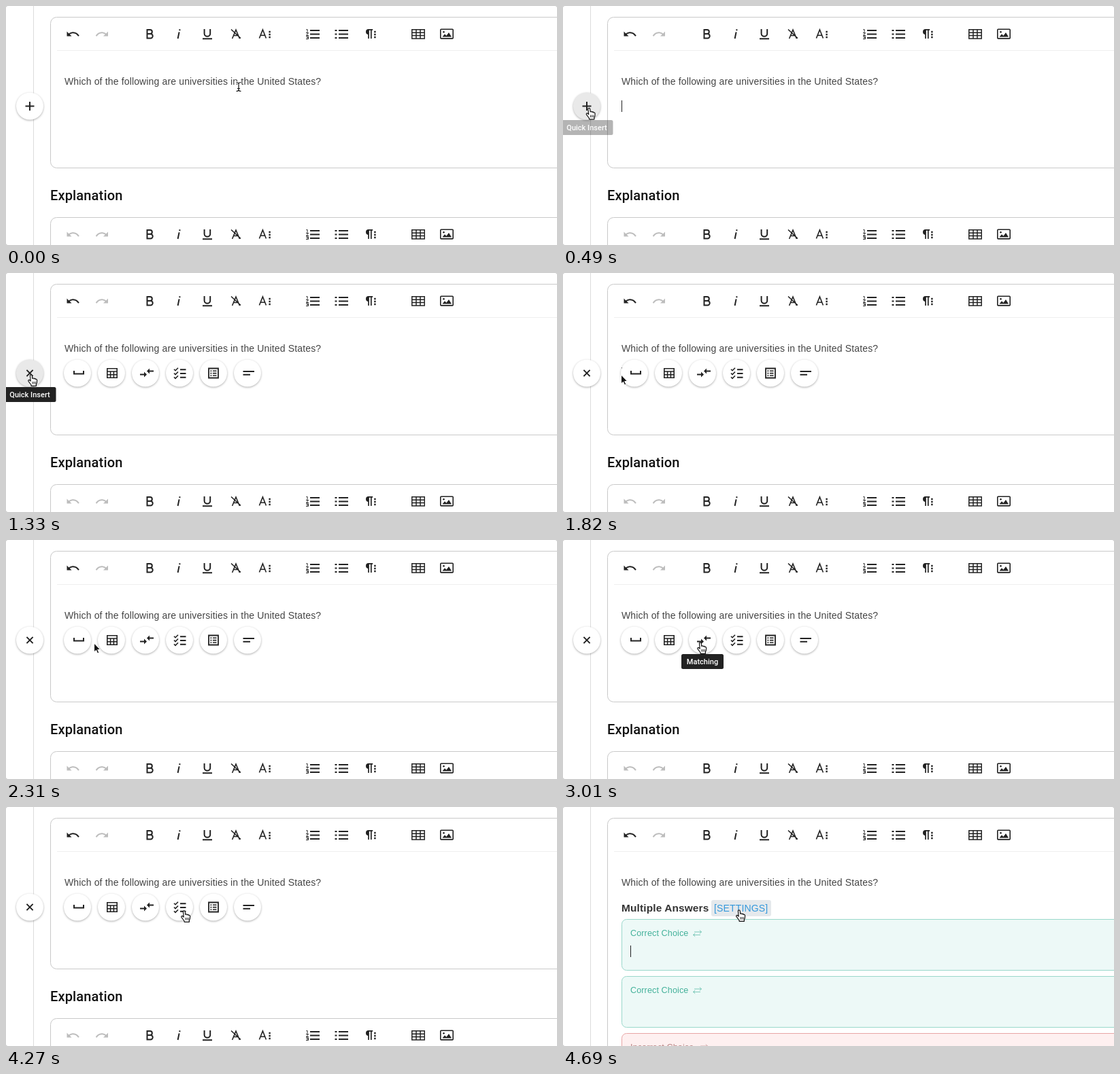
An HTML page for the animation above (4760 ms loop, 810 by 352 pixels).

```html
<!DOCTYPE html>
<html lang="en">
<head>
<meta charset="utf-8">
<title>Quick insert</title>
<style>
html, body { margin: 0; width: 100%; height: 100%; overflow: hidden; background: #fff; }
svg { display: block; }
.line { fill: none; stroke: #222; stroke-width: 2; }
.thin { stroke-width: 1.6; }
.box { fill: #fff; stroke: #c9c9c9; }
.body { font: 14px "Liberation Sans", Arial, sans-serif; letter-spacing: .15px; fill: #444; }
.head { font: 500 20px Roboto, sans-serif; letter-spacing: .15px; fill: #111; }
.tip text { font: 500 11px Roboto, sans-serif; fill: #fff; text-anchor: middle; }
.label { font: 12.6px "Liberation Sans", Arial, sans-serif; letter-spacing: .1px; }
.disc { fill: #fff; filter: drop-shadow(0 1px 1.5px rgba(0,0,0,.32)); }
.press { fill: #000; opacity: .22; filter: blur(7px); }
</style>
</head>
<body>
<svg width="810" height="352" viewBox="0 0 810 352">
  <defs>
    <path id="undo" d="M10.4 9.4c-1.7.3-3.2.9-4.6 2L3 8.5v7h7l-2.7-2.7c3.7-2.6 8.8-1.8 11.5 1.9.2.3.5.7.7 1l1.8-.9c-2.2-4.2-6.6-6.4-10.9-5.4z"/>
    <g id="dots"><path d="M-1.2-5.2h2.4v2.4h-2.4zM-1.2-1.2h2.4v2.4h-2.4zM-1.2 2.8h2.4v2.4h-2.4z" fill="#222"/></g>
    <g id="tools">
      <use href="#undo" transform="translate(129 29) translate(24 0) scale(-1 1)" fill="#bdbdbd"/>
      <path class="line" d="M207.5 35h4.3a3 3 0 0 1 0 6h-4.3zM207.5 41h5a3.2 3.2 0 0 1 0 6.4h-5z"/>
      <path class="line" d="M252.6 48l2-9.6M255.2 36.2l.4-2"/>
      <path class="line" d="M291.6 34v6.4a4.3 4.3 0 0 0 8.6 0V34M289 48.2h14"/>
      <path class="line thin" d="M332.6 48l5.4-13 5.4 13M334.6 43.5h7M331 34.5l14 13"/>
      <path class="line thin" d="M372.4 47.5l5-12.5 5 12.5M374 43.2h6.8"/>
      <use href="#dots" x="387.6" y="42"/>
      <path class="line" d="M447 36h14M447 41.5h14M447 47h14M489 36h14M489 41.5h14M489 47h14"/>
      <path class="line" stroke-dasharray="3 20" d="M483.5 36h3M483.5 41.5h3M483.5 47h3"/>
      <path class="line" style="stroke-width:1" d="M441.5 34.5h1.5v4M441 39.5h3.5l-3 4h3.5M441 45h3.5v3.5h-3.5M442 46.7h2.5"/>
      <path d="M533 34a4 4 0 0 0 0 8z" fill="#222"/>
      <path class="line" style="stroke-width:1.7" d="M533 48V35M536.8 48V35M532 34.9h7.2"/>
      <use href="#dots" x="542.4" y="42"/>
      <path class="line" style="stroke-width:1.5" d="M596.8 34.8h18.4v13.2h-18.4zM596.8 39.2h18.4M596.8 43.6h18.4M603 34.8v13.2M609 34.8v13.2"/>
      <rect class="line thin" x="638.8" y="34.3" width="18.4" height="13.6" rx="1"/>
      <path d="M641.5 45.5l3.5-4.2 2.4 2.4 3.6-4.6 4 6.4z" fill="#222"/>
      <circle cx="643.5" cy="38.2" r="1.3" fill="#222"/>
    </g>
    <g id="swap"><path d="M2 3.2h10.5M9.8.8l2.7 2.4-2.7 2.4M11 7.6H.5M3.2 5.2L.5 7.6 3.2 10" fill="none"/></g>
  </defs>

  <rect width="810" height="352" fill="#c4c4c4"/>
  <rect width="810" height="352" rx="3" fill="#fff"/>
  <path d="M40.5 0v352" stroke="#dcdcdc"/>

  <rect id="editor" class="box" x="65.5" y="16.5" width="780" height="222" rx="9"/>
  <path d="M75 65.5h735" stroke="#efefef"/>
  <use href="#undo" x="86.5" y="29" fill="#222"/>
  <use href="#tools"/>
  <text class="body" x="86" y="116">Which of the following are universities in the United States?</text>

  <g id="lower">
    <text class="head" x="65" y="285.5">Explanation</text>
    <rect class="box" x="65.5" y="311.5" width="780" height="222" rx="9"/>
    <use href="#undo" x="86.5" y="324" fill="#bdbdbd"/>
    <use href="#tools" y="295"/>
  </g>

  <g id="answers">
    <text class="body" x="86" y="154" style="font-size:15.4px;font-weight:bold;fill:#333">Multiple Answers</text>
    <rect x="218" y="137" width="88" height="24" rx="3" fill="#e5e9ec"/>
    <text class="body" x="222" y="154" style="fill:#3498db">[SETTINGS]</text>
    <g id="choices"></g>
  </g>

  <rect id="caret" width="1" height="17" fill="#222"/>
  <g id="dial"></g>
  <g id="tips"></g>

  <g id="cursor" stroke-linejoin="round">
    <g id="beam" fill="none">
      <path d="M-3.5-6.5Q0-6.5 0-4.5V4.5Q0 6.5-3.5 6.5M3.5-6.5Q0-6.5 0-4.5V4.5Q0 6.5 3.5 6.5M-2 2.5h4" stroke="#fff" stroke-width="3"/>
      <path d="M-3.5-6.5Q0-6.5 0-4.5V4.5Q0 6.5-3.5 6.5M3.5-6.5Q0-6.5 0-4.5V4.5Q0 6.5 3.5 6.5M-2 2.5h4" stroke="#111" stroke-width="1.2"/>
    </g>
    <path id="arrow" d="M.5 0v13l3-2.7 2.1 4.7 2.2-1-2.1-4.5h4z" fill="#111" stroke="#fff"/>
    <g id="hand">
      <path d="M-1.6 1C-1.6-.6 1-.6 1.2 1L1.8 5.5C2.2 4.4 4 4.5 4.2 6 4.7 5 6.3 5.3 6.5 6.7 7.2 6 8.5 6.5 8.6 8L8.4 11.5 7.4 14V16.3H.2L-.2 14.5-3.9 9.6C-5 8-3.2 6.6-2 8L-.8 9.2Z" fill="#fff" stroke="#111" stroke-width="1.2"/>
      <path d="M2 10v3.6M4.1 10v3.6M6.2 10v3.6" stroke="#111" stroke-width=".9"/>
    </g>
  </g>
</svg>
<script>
const LOOP = 4760, STEP = 70, DIAL_Y = 147.5;
const $ = id => document.getElementById(id);
const clamp = v => Math.max(0, Math.min(1, v));
const ramp = (t, a, b) => clamp((t - a) / (b - a));
const show = (el, on) => el.setAttribute('display', on ? 'inline' : 'none');

// Icons are drawn around the centre of each round button
const ICONS = [
  '<path class="line" d="M-5-3.5v4.6H9v-4.6"/>',
  '<path class="line thin" d="M-6.2-6.7H8.2V6.7H-6.2zM-6.2-2.5H8.2M-6.2 2.2H8.2M-1.4-2.5V6.7M3.4-2.5V6.7"/>',
  '<path class="line" d="M-8 2H-1M12-3H5"/><path d="M-2-2l4 4-4 4zM6-7l-4 4 4 4z" fill="#222"/>',
  '<path class="line" d="M1-5.3h8.5M1 .5h8.5M1 6.3h8.5"/>' +
    '<path class="line thin" d="M-8-5.8l2 2 4-4M-8 0l2 2 4-4M-8 5.8l2 2 4-4"/>',
  '<path class="line" d="M-7-7H7V7H-7z" style="stroke-width:1.8"/>' +
    '<path class="line thin" d="M-4.6-3.3h2M-4.6.1h2M-4.6 3.5h2M-1-3.3h5.5M-1 .1h5.5M-1 3.5h5.5"/>',
  '<path class="line" d="M-6.5-2.5H10M-6.5 2.3H4"/>'
];
const disc = icon => `<g><circle class="press" r="21" cy="5"/><circle class="disc" r="20"/><g>${icon}</g></g>`;
$('dial').innerHTML = disc('<path class="line" d="M-6.5 0h13M0-6.5v13"/>') + ICONS.map(disc).join('');
const buttons = [...$('dial').children].map((el, i) => ({
  el, x: i ? 55 + 50 * i : 35,
  press: el.children[0], face: el.children[1], icon: el.children[2]
}));

// label, centre, width, opacity over time
const TIPS = [
  ['Quick Insert', 35, 77, t => t < 1100
    ? ramp(t, 420, 630) - ramp(t, 910, 990)
    : ramp(t, 1190, 1330) - ramp(t, 1680, 1820)],
  ['Fill in the Blanks', 105, 98, t => ramp(t, 1890, 2030) - ramp(t, 2210, 2300)],
  ['Matching', 205, 62, t => ramp(t, 2800, 2940) - ramp(t, 3220, 3360)],
  ['Multiple Answers', 255, 102, t => t < 4130 ? ramp(t, 3400, 3570) : 0]
];
$('tips').innerHTML = TIPS.map(([text, x, w]) => `<g class="tip">
  <rect x="${x - w / 2}" y="168" width="${w}" height="22" rx="2.5" fill="#222"/>
  <text x="${x}" y="183">${text}</text></g>`).join('');
const tips = [...$('tips').children];

const choice = (text, y, fill, edge, ink, arrowX) => `
  <rect x="86.5" y="${y}" width="760" height="75" rx="7" fill="${fill}" stroke="${edge}"/>
  <text class="label" x="99" y="${y + 24.5}" fill="${ink}">${text}</text>
  <use href="#swap" x="${arrowX}" y="${y + 15.3}" stroke="${ink}" opacity=".65"/>`;
const GREEN = ['#edf9f7', '#9ad8cb', '#43b19a', 191];
$('choices').innerHTML =
  choice('Correct Choice', 165.5, ...GREEN) +
  choice('Correct Choice', 249.5, ...GREEN) +
  choice('Incorrect Choice', 333.5, '#fef0f0', '#e8a5a5', '#b98585', 200);

// time, x, y of the pointer
const PATH = [
  [0, 342, 119], [140, 290, 125], [280, 120, 143], [420, 40, 151], [560, 37, 150],
  [1400, 37, 150], [1540, 46, 151], [1610, 46, 151], [1820, 85, 150], [2030, 104, 151],
  [2170, 112, 152], [2310, 129, 152], [2730, 186, 152], [3010, 202, 151], [3150, 203, 151],
  [3290, 228, 152], [3640, 262, 153], [4480, 262, 153], [4690, 259, 152]
];
function pointer(t) {
  const i = PATH.findIndex(p => p[0] > t);
  if (i < 0) return PATH[PATH.length - 1].slice(1);
  const a = PATH[i - 1], b = PATH[i], k = ramp(t, a[0], b[0]);
  return [a[1] + (b[1] - a[1]) * k, a[2] + (b[2] - a[2]) * k];
}

function dialScale(t, i) {
  const open = ramp(t, 930 + 30 * i, 1150 + 30 * i);
  const close = ramp(t, 4270 + 20 * (5 - i), 4410 + 20 * (5 - i));
  return (1 - (1 - open) ** 2) * (1 - close);
}

function draw(t) {
  const done = t >= 4480;
  const [x, y] = pointer(t);
  const over = b => Math.hypot(x - b.x, y - DIAL_Y) < 19.5;

  show($('lower'), !done);
  show($('answers'), done);
  show($('dial'), !done);
  $('editor').setAttribute('height', done ? 600 : 222);

  buttons.forEach((b, i) => {
    const s = i ? dialScale(t, i - 1) : 1 - ramp(t, 4340, 4480);
    b.el.setAttribute('transform', `translate(${b.x} ${DIAL_Y}) scale(${s})`);
    show(b.el, s > 0);
    show(b.press, i === 0 ? t >= 770 && t < 910 : i === 4 && t >= 4130 && t < 4270);
  });
  const fab = buttons[0];
  const turn = 45 * (ramp(t, 900, 1010) - ramp(t, 4270, 4410));
  fab.icon.setAttribute('transform', `rotate(${turn})`);
  fab.face.style.fill = over(fab) ? '#e9e9e9' : '#fff';

  TIPS.forEach((tip, i) => tips[i].setAttribute('opacity', clamp(tip[3](t))));

  const caret = $('caret');
  caret.setAttribute('x', done ? 99 : 86);
  caret.setAttribute('y', done ? 204 : 139);
  show(caret, done || Math.floor((t + 12) / 500) % 2 === 1);

  const hand = done || buttons.some((b, i) => (i === 0 || t > 1300) && over(b));
  const beam = !hand && t < 900 && x > 66;
  show($('hand'), hand);
  show($('beam'), beam);
  show($('arrow'), !hand && !beam);
  $('cursor').setAttribute('transform', `translate(${x} ${y})`);
}

const start = performance.now();
function tick() {
  const t = (performance.now() - start) % LOOP;
  draw(Math.floor(t / STEP) * STEP);
  requestAnimationFrame(tick);
}
draw(0);
requestAnimationFrame(tick);
</script>
</body>
</html>
```
